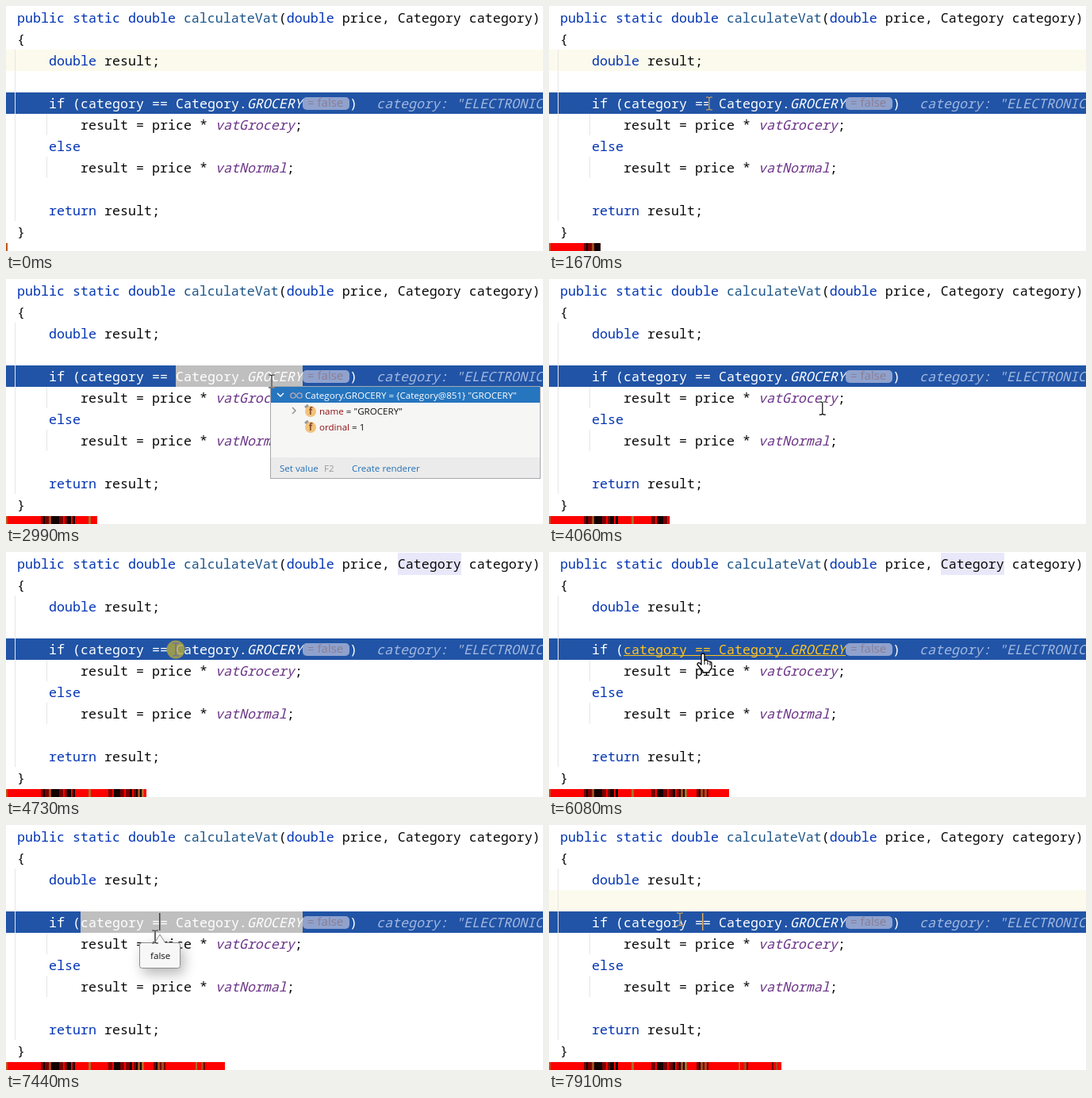
Animation of 677 by 309 pixels, one loop 7990 ms. Source, as an HTML page:

```html
<!DOCTYPE html>
<html lang="en">
<head>
<meta charset="utf-8">
<title>Debugger: evaluating expressions</title>
<style>
html, body { margin: 0; width: 100%; height: 100%; overflow: hidden; background: #fff; }
svg { display: block; width: 677px; height: 309px; }
text { white-space: pre; }
.code { font: 16.667px "Noto Sans Mono", monospace; fill: #080808; font-variant-ligatures: none; }
.ui { font: 11.6px "Open Sans", sans-serif; fill: #111; }
.hint { font: 15px "Open Sans", sans-serif; fill: #8d7d92; }
.kw { fill: #0033b3; }
.fn { fill: #1c5488; }
.field { fill: #6c3488; font-style: italic; }
.it { font-style: italic; }
.value { fill: #a3b8e0; font-style: italic; }
.exec { fill: #fff; }
.link { fill: #ffc31f; }
.var { fill: #8b1010; }
.blue { fill: #2470b3; }
.gray { fill: #999; }
.mark { font-weight: 700; fill: #8a4b2c; text-anchor: middle; }
.invert { mix-blend-mode: difference; }
#tip { filter: drop-shadow(4px 7px 8px rgba(0,0,0,.28)); }
</style>
</head>
<body>
<svg id="stage" viewBox="0 0 677 309"></svg>
<script>
const LOOP = 7990, STEPS = 118, CELL = 2.49;

// Steps at which the debugger changes state
const CLICK_NAME = 42, CLOSE_POPUP = 50, CLICK_CARET = 69, CLICK_TEST = 96, CLOSE_TIP = 112;
const clicks = [CLICK_NAME, CLICK_CARET, CLICK_TEST];

// Eased pointer moves; the pointer rests between them
const entry = { x: 386, y: 322 };
const moves = [
  { from: 17, to: 21, x: 335, y: 165 },
  { from: 21, to: 25, x: 202, y: 123 },
  { from: 25, to: 34, x: 335, y: 129 },
  { from: 51, to: 57, x: 374, y: 172 },
  { from: 57, to: 68, x: 214, y: 123 },
  { from: 74, to: 82, x: 194, y: 129 },
  { from: 98, to: 100, x: 188, y: 141 },
  { from: 112, to: 116, x: 165, y: 119 },
];

const within = (n, from, to) => n >= from && n < to;
const ease = k => k * k * (3 - 2 * k);

function pointer(n) {
  let { x, y } = entry;
  for (const move of moves) {
    const k = ease(Math.max(0, Math.min(1, (n - move.from) / (move.to - move.from))));
    x += (move.x - x) * k;
    y += (move.y - y) * k;
  }
  return { x, y };
}

const rect = (x, y, w, h, fill, more = '') => `<rect x="${x}" y="${y}" width="${w}" height="${h}" fill="${fill}" ${more}/>`;
const text = (x, y, body, cls = 'code') => `<text x="${x}" y="${y}" class="${cls}">${body}</text>`;
const span = (cls, body) => `<tspan class="${cls}">${body}</tspan>`;
const kw = body => span('kw', body);
const line = (row, col, body, cls) => text(14 + col * 10, 21 + row * 27, body, cls);
const group = (id, body, more = '') => `<g id="${id}" ${more}>${body}</g>`;
const stroke = (d, color, width = 1) => `<path d="${d}" fill="none" stroke="${color}" stroke-width="${width}"/>`;

// Activity strip: red while nothing moves, seeded dark mix while the pointer does
function activityBar() {
  let seed = 11, cells = rect(0, 299, 2, 10, '#c0561f');
  const random = () => (seed = seed * 16807 % 2147483647) / 2147483647;
  const palette = ['#7a0000', '#7a0000', '#140000', '#140000', '#fe0000', '#a8481c'];
  for (let n = 1; n < STEPS; n++) {
    const busy = moves.some(m => within(n, m.from + 1, m.to + 1));
    const color = clicks.includes(n) ? '#b06a28' : busy ? palette[Math.floor(random() * palette.length)] : '#fe0000';
    cells += rect(2 + CELL * (n - 1), 299, CELL, 10, color);
  }
  return cells;
}

const fieldRow = (y, name, value) =>
  `<circle cx="384" cy="${y - 4}" r="7" fill="#f2c27c"/>` + text(384, y, 'f', 'ui mark') +
  stroke(`M377 ${y - 9}l4-3`, '#9a9a9a', 3) +
  text(395, y, span('var', name) + ' = ' + value, 'ui');

const glasses = [362, 370].map(x => `<circle cx="${x}" cy="147" r="3.2" fill="none" stroke="#b9a9b4" stroke-width="1.3"/>`).join('');

const popup = rect(333.5, 135.5, 340, 116, '#f6f6f5', 'stroke="#a5a8ac"') +
  rect(334, 136, 339, 20, '#2675bf') + rect(334, 225, 339, 26, '#ebebeb') +
  stroke('M342 144l4 4 4-4', '#fff', 1.4) + glasses +
  text(377, 151, 'Category.GROCERY = {Category@851} "GROCERY"', 'ui exec') +
  stroke('M361 162l4 4-4 4', '#888', 1.3) +
  fieldRow(171, 'name', '"GROCERY"') + fieldRow(191, 'ordinal', '1') +
  text(345, 243, 'Set value', 'ui blue') + text(401, 243, 'F2', 'ui gray') +
  text(436, 243, 'Create renderer', 'ui blue');

const tip = rect(168.5, 148.5, 51, 32, '#f7f7f7', 'rx="3" stroke="#8c8c8c"') +
  '<path d="M187 149L194 138L201 149" fill="#f7f7f7" stroke="#8c8c8c"/>' + text(182, 169, 'false', 'ui');

const hand = `<path d="M-2 1Q-2-1 0-1T2 1V8Q5 6 6 9Q8 8 9 10Q11 9 11 12V16Q11 19 8 21V23H0V21
  Q-3 18-7 13Q-7 10-4 11L-2 13Z" fill="#fff" stroke="#000" stroke-width="1.3" stroke-linejoin="round"/>` +
  stroke('M2 8V13M6 10V13M9 11V14', '#000');
const beam = stroke('M-4-8h2.5l1.5 1 1.5-1h2.5M0-7V7M-4 8h2.5l1.5-1 1.5 1h2.5', '#fff', 1.2);

document.getElementById('stage').innerHTML =
  '<clipPath id="barClip"><rect id="barWidth" y="299" width="2" height="10"/></clipPath>' +
  rect(0, 0, 677, 309, '#fff') +
  rect(0, 55, 677, 27, '#fcfaed', 'id="caretRow"') +
  rect(494, 1, 80, 28, '#e9e7fa', 'id="usage"') +
  rect(0, 109, 677, 27, '#2154a6') +
  stroke('M11.5 55V271M51.5 136V163M51.5 190V217', '#e6e6e6') +
  rect(214, 109, 160, 27, '#bfbfbf', 'id="selection"') +
  line(0, 0, kw('public static double ') + span('fn', 'calculateVat') + '(' + kw('double') + ' price, Category category)') +
  line(1, 0, '{') +
  line(2, 4, kw('double') + ' result;') +
  line(4, 4, `if (<tspan id="left">category == </tspan><tspan id="right">Category.${span('it', 'GROCERY')}</tspan>`, 'code exec') +
  rect(374, 115, 59, 16, '#8fa2cd', 'rx="5"') + text(380, 127, '= false', 'hint') +
  text(433, 129, ')', 'code exec') +
  text(467, 129, 'category: "ELECTRONICS"', 'code value') +
  rect(94, 130, 280, 1, '#ffc31f', 'id="underline"') +
  line(5, 8, 'result = price * ' + span('field', 'vatGrocery') + ';') +
  line(6, 4, kw('else')) +
  line(7, 8, 'result = price * ' + span('field', 'vatNormal') + ';') +
  line(9, 4, kw('return') + ' result;') +
  line(10, 0, '}') +
  group('bar', activityBar(), 'clip-path="url(#barClip)" shape-rendering="crispEdges"') +
  rect(193, 111, 1.5, 22, '#fff', 'id="caret" class="invert"') +
  group('popup', popup) + group('tip', tip) +
  group('click', '<circle r="11.5" fill="#b4aa3c" fill-opacity=".8"/>') +
  group('beam', beam, 'class="invert"') + group('hand', hand);

const el = id => document.getElementById(id);
const show = (id, on) => el(id).setAttribute('visibility', on ? 'visible' : 'hidden');

function render(time) {
  const n = Math.max(0, Math.min(STEPS - 1, Math.ceil(time / LOOP * STEPS - .1)));
  const { x, y } = pointer(n);
  const linkRight = within(n, 34, CLICK_NAME), linkAll = within(n, 82, CLICK_TEST);
  const selectRight = within(n, CLICK_NAME, CLOSE_POPUP), selectAll = within(n, CLICK_TEST, CLOSE_TIP);
  const handOn = linkRight || linkAll, start = linkAll || selectAll ? 94 : 214;

  el('barWidth').setAttribute('width', Math.ceil(2 + CELL * n));
  show('caretRow', n < CLICK_NAME || n >= CLOSE_TIP);
  el('caretRow').setAttribute('y', n < CLICK_NAME ? 55 : 82);
  show('usage', within(n, CLICK_CARET + 1, CLICK_TEST));

  show('selection', selectRight || selectAll);
  show('underline', handOn);
  for (const id of ['selection', 'underline']) {
    el(id).setAttribute('x', start);
    el(id).setAttribute('width', 374 - start);
  }
  el('left').setAttribute('class', linkAll ? 'link' : '');
  el('right').setAttribute('class', handOn ? 'link' : '');

  show('caret', n >= CLICK_TEST);
  show('popup', within(n, CLICK_NAME + 1, CLOSE_POPUP));
  show('tip', within(n, CLICK_TEST + 1, CLOSE_TIP));
  show('click', clicks.some(c => within(n, c, c + 2)));
  show('beam', n >= moves[0].from && !handOn);
  show('hand', handOn);
  for (const id of ['click', 'beam', 'hand']) el(id).setAttribute('transform', `translate(${x} ${y})`);
}

const began = performance.now();
function tick() {
  render((performance.now() - began) % LOOP);
  requestAnimationFrame(tick);
}
tick();
</script>
</body>
</html>
```
